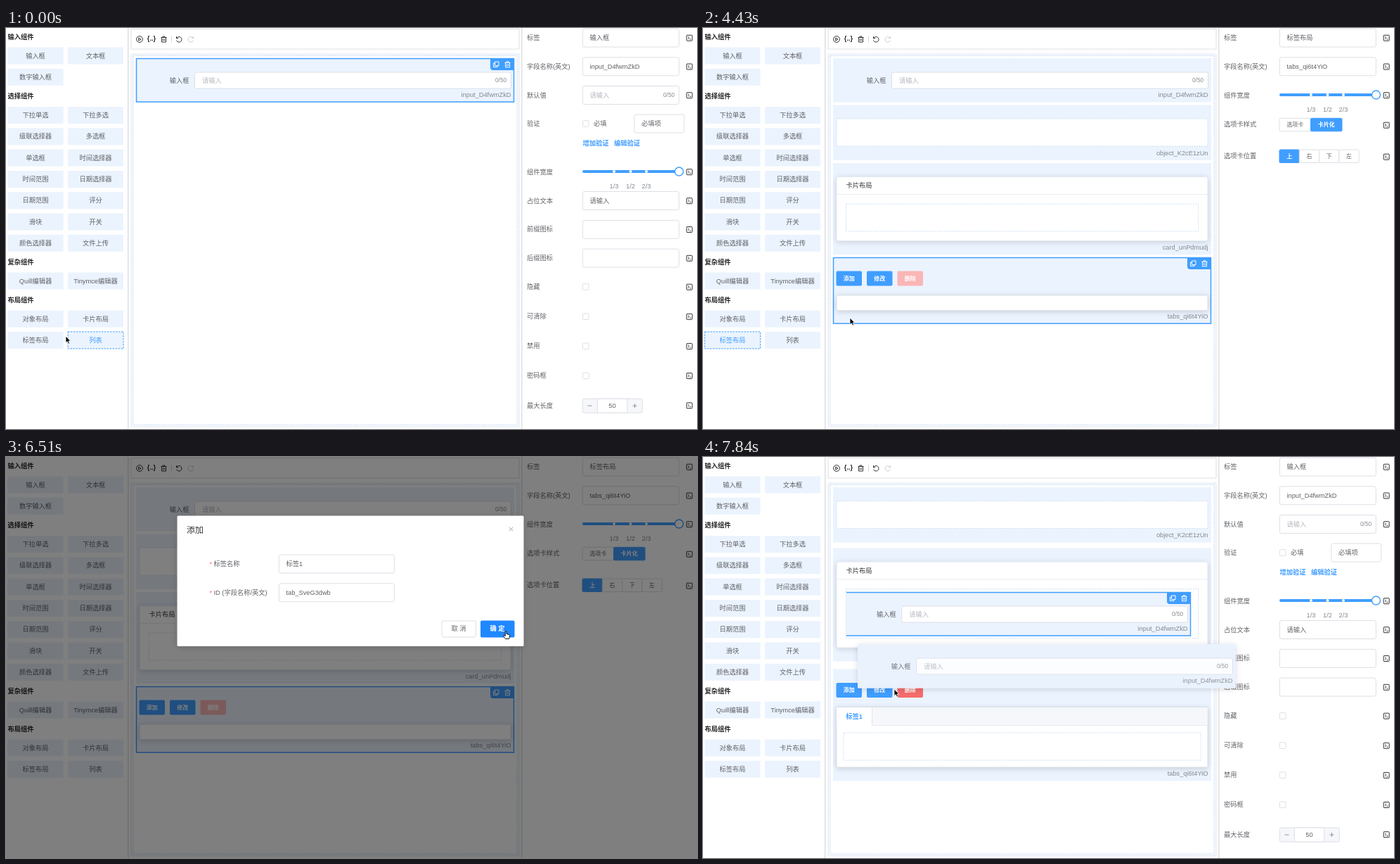
Recreate the animation shown at these times as an HTML page with a canvas. Size 983 by 570 pixels, loop 7.99 s.

```html
<!DOCTYPE html>
<html lang="zh">
<head>
<meta charset="utf-8">
<style>
  html, body { margin: 0; width: 100%; height: 100%; overflow: hidden; background: #fff; }
  canvas { display: block; }
</style>
</head>
<body>
<canvas id="stage" width="983" height="570"></canvas>
<script>
const g = document.getElementById('stage').getContext('2d');
const LOOP = 7990, TICK = 148, LAST = 53;
const BLUE = '#409eff', PALE = '#ebf3fe', GREY = '#606266', LINE = '#dcdfe6', RED = '#f56c6c';
const FONT = '"Liberation Sans", "Noto Sans CJK SC", sans-serif';

// ---- drawing helpers ----
function box(x, y, w, h, fill, line, { r = 0, dash = [], lw = 1, shadow } = {}) {
  g.save();
  g.beginPath();
  g.roundRect(x, y, w, h, r);
  if (shadow) { g.shadowColor = 'rgba(0,0,0,.16)'; g.shadowBlur = 8; g.shadowOffsetY = 1.5; }
  if (fill) { g.fillStyle = fill; g.fill(); }
  g.shadowColor = 'transparent';
  if (line) { g.strokeStyle = line; g.lineWidth = lw; g.setLineDash(dash); g.stroke(); }
  g.restore();
}

function text(s, x, y, color = GREY, { align = 'left', size = 9.25, weight = 400 } = {}) {
  g.font = `${weight} ${size}px ${FONT}`;
  g.textAlign = align;
  g.textBaseline = 'middle';
  g.fillStyle = color;
  g.fillText(s, x, y + .5);
}
const mid = (s, x, y, color, o) => text(s, x, y, color, { align: 'center', ...o });

function stroke(x, y, d, color, lw = 1, fill) {
  g.save();
  g.translate(x, y);
  const p = new Path2D(d);
  if (fill) { g.fillStyle = fill; g.fill(p); }
  g.strokeStyle = color;
  g.lineWidth = lw;
  g.stroke(p);
  g.restore();
}

function disc(x, y, r, fill, line, lw = 1) {
  box(x - r, y - r, 2 * r, 2 * r, fill, line, { r, lw });
}

const trash = (x, y, c) => stroke(x, y, 'M-4 -2.5H4M-1.5 -2.5V-4H1.5V-2.5M-3 -2.5V4H3V-2.5M-1 -.5V2.2M1 -.5V2.2', c);
const copy = (x, y, c) => stroke(x, y, 'M-1.5 -3.5H4V2H-1.5ZM-1.5 -1.5H-3.5V4H2V2', c);
const turn = (x, y, c) => stroke(x, y, 'M-3.5 -4V-1.2H-.8M-3.2 -1.5A3.8 3.8 0 1 1 -3.4 1.6', c);

// ---- left panel ----
const GROUPS = [
  [12.5, '输入组件', ['输入框', '文本框', '数字输入框']],
  [97, '选择组件', ['下拉单选', '下拉多选', '级联选择器', '多选框', '单选框', '时间选择器', '时间范围',
    '日期选择器', '日期范围', '评分', '滑块', '开关', '颜色选择器', '文件上传']],
  [332.5, '复杂组件', ['Quill编辑器', 'Tinymce编辑器']],
  [386.5, '布局组件', ['对象布局', '卡片布局', '标签布局', '列表']]
];

function chip(s, x, y, hot, shadow) {
  const o = hot ? { dash: [2.5, 1.5], shadow } : {};
  box(x, y, 79, 24, PALE, hot && BLUE, o);
  mid(s, x + 39.5, y + 12, hot ? BLUE : GREY);
}

function palette(hot) {
  for (const [y, title, items] of GROUPS) {
    text(title, 2.5, y, '#222', { weight: 700 });
    items.forEach((s, k) => chip(s, k % 2 ? 88 : 2.5, y + 15 + (k >> 1) * 30.3, s === hot));
  }
}

// ---- middle ----
function frame() {
  box(173, -2, 1.5, 574, '#dedfe2');
  box(733, -2, 1.5, 574, '#dedfe2');
  box(178, 1.5, 552, 28.5, '#fff', '#dedfe2');
  disc(190, 16, 4.4, null, '#333');
  stroke(190, 16, 'M-1.3 -2L2 0L-1.3 2Z', '#333');
  mid('{..}', 207, 15, '#222', { weight: 700 });
  trash(224.5, 16, '#333');
  box(235, 11.5, .8, 9, '#ccc');
  turn(246, 16, '#333');
  g.save(); g.translate(263, 0); g.scale(-1, 1); turn(0, 16, '#d0d0d0'); g.restore();
  box(178, 37, 552, 530, '#f6f9fd', '#e3e8ef');
  box(181, 39.5, 546, 524.5, '#fff', '#c5dcf5', { dash: [2, 1.5] });
}

function block(x, y, w, h, id, selected) {
  box(x, y, w, h, PALE);
  text(id, x + w - 4.5, y + h - 10.5, '#85888e', { align: 'right' });
  if (!selected) return;
  box(x + .5, y + .5, w - 1, h - 1, null, BLUE, { lw: 1.5 });
  box(x + w - 34, y, 34, 17, BLUE, null, { r: [0, 0, 0, 4] });
  copy(x + w - 26, y + 8.5, '#fff');
  trash(x + w - 9.5, y + 8.8, '#fff');
}

const drop = (x, y, w, h) => box(x, y, w, h, '#fff', '#cfdff0', { dash: [2, 1.5] });

function inputBlock(x, y, w, selected) {
  const shift = (538 - w) * .06;
  block(x, y, w, 62.5, 'input_D4fwmZkD', selected);
  text('输入框', x + 75.5 - shift, y + 31.5, GREY, { align: 'right' });
  box(x + 83.5 - shift, y + 20, w - 88 + shift, 23, '#fff', LINE, { r: 2.5 });
  text('请输入', x + 94 - shift, y + 31.5, '#b5b8bf');
  text('0/50', x + w - 11, y + 31.5, '#85888e', { align: 'right', size: 8.2 });
}

function objectBlock(y, selected) {
  block(185, y, 538, 78.5, 'object_K2cE1zUn', selected);
  drop(190, y + 19.5, 528, 39);
}

function cardBlock(y, grow, selected) {
  block(185, y, 538, 130 + grow, 'card_unPdmudj', selected);
  box(190, y + 19.5, 528, 91 + grow, '#fff', '#e4e8ef', { r: 2.5, shadow: true });
  text('卡片布局', 203.5, y + 32, '#303133');
  box(190, y + 44, 528, .8, '#e4e7ed');
  drop(203.5, y + 58, 501, 39 + grow);
}

function button(s, x, y, color) {
  box(x, y, 36.5, 21, color, null, { r: 2 });
  mid(s, x + 18.2, y + 10.5, '#fff', { size: 8, weight: 700 });
}

function tabsBlock(y, filled, focus, selected) {
  block(185, y, 538, filled ? 159 : 94.5, 'tabs_qi6t4YiO', selected);
  button('添加', 189.5, y + 19.5, focus ? '#66b1ff' : BLUE);
  button('修改', 233, y + 19.5, BLUE);
  button('删除', 276.5, y + 19.5, filled ? RED : '#fab6b6');
  box(190, y + 54, 528, filled ? 85.5 : 21.5, '#fff', LINE, { shadow: true });
  if (!filled) return;
  box(190.5, y + 54.5, 527, 25.5, '#f5f7fa');
  box(240, y + 79.5, 478, .8, '#e4e7ed');
  box(190.5, y + 54.5, 49.5, 26.5, '#fff');
  box(240, y + 54.5, .8, 25.5, LINE);
  mid('标签1', 215, y + 67.5, BLUE, { weight: 700 });
  drop(200, y + 90.5, 508, 39);
}

function bar(s, y) {
  box(185, y, 538, 22.5, PALE);
  mid(s, 454, y + 11);
}

// ---- right panel ----
function prompt(y) {
  box(968.2, y - 3.8, 8, 8, null, '#333', { r: .8 });
  stroke(972, y, 'M-2 -1.8L0 0L-2 1.8M.5 2H2.5', '#333', .9);
}

function row(s, y, iconY = y) {
  text(s, 741, y);
  if (iconY) prompt(iconY);
}

function field(x, y, w, s = '', color = GREY) {
  box(x + .3, y - 13, w, 26, '#fff', LINE, { r: 2.5 });
  text(s, x + 10.5, y, color);
}

function slider(y, full) {
  box(820, y - 2, 137.5, 4, full ? BLUE : '#e4e7ed', null, { r: 2 });
  if (full) [865, 888.5, 911].forEach((x, k) => {
    disc(x, y, 2, '#fff');
    mid(['1/3', '1/2', '2/3'][k], x, y + 20.5, '#85888e');
  });
  disc(full ? 957.5 : 820, y, 6, '#fff', BLUE, 1.4);
}

function radios(y, w, names, active) {
  names.forEach((s, k) => {
    const on = k === active, x = 820 + k * w;
    box(x, y - 9, w, 18.5, on ? BLUE : '#fff', on ? BLUE : LINE, { r: 1.5 });
    mid(s, x + w / 2, y, on ? '#fff' : GREY, { size: 8, weight: on ? 700 : 400 });
  });
}

function stepper(x, y, value) {
  box(x + .3, y - 10, 85, 20, '#f5f7fa', LINE, { r: 2.5 });
  box(x + 21.3, y - 10, 42.5, 20, '#fff', LINE);
  mid(value, x + 42.5, y);
  stroke(x + 10.5, y, 'M-3 0H3M61 0H67M64 -3V3', '#85888e', .9);
}

function check(y) {
  box(820.4, y - 4.3, 8.6, 8.6, '#fff', LINE, { r: 1 });
}

const HEADS = {
  input: ['输入框', 'input_D4fwmZkD'], object: ['对象布局', 'object_K2cE1zUn'],
  card: ['卡片布局', 'card_unPdmudj'], tabs: ['标签布局', 'tabs_qi6t4YiO']
};

function width(y) {
  row('组件宽度', y);
  slider(y - .5, true);
}

const PANELS = {
  input() {
    row('默认值', 95.5);
    field(820, 95.5, 137, '请输入', '#b5b8bf');
    text('0/50', 951, 95.5, '#85888e', { align: 'right', size: 8.2 });
    row('验证', 136, 0);
    check(136);
    text('必填', 836, 136, GREY, { weight: 500 });
    field(893.5, 136, 71, '必填项');
    text('增加验证', 820.5, 164, BLUE, { weight: 700 });
    text('编辑验证', 865, 164, BLUE, { weight: 700 });
    width(204.5);
    ['占位文本', '前缀图标', '后缀图标'].forEach((s, k) => {
      const y = 245.5 + k * 40.8;
      row(s, y);
      field(820, y, 137, k ? '' : '请输入');
    });
    ['隐藏', '可清除', '禁用', '密码框'].forEach((s, k) => {
      row(s, 368 + k * 42.1);
      check(368 + k * 42.1);
    });
    row('最大长度', 536.5);
    stepper(820, 537, '50');
  },
  object() {
    width(95.5);
    row('行内间距', 136);
    slider(135.5);
  },
  card() {
    PANELS.object();
    row('阴影显示', 177.5, 179);
    radios(178, 36.4, ['总是', '悬浮', '从不'], 0);
    row('内边距', 222, 266.5);
    [...'上右下左'].forEach((s, k) => {
      text(s + ':', 820, 222 + k * 29.7, '#303133', { weight: 500 });
      stepper(838, 222 + k * 29.7, '20');
    });
  },
  tabs() {
    width(95.5);
    row('选项卡样式', 136.5, 138);
    radios(137.3, 44.5, ['选项卡', '卡片化'], 1);
    row('选项卡位置', 181.5, 183);
    radios(182, 28.3, [...'上右下左'], 0);
  }
};

function panel(kind) {
  ['标签', '字段名称(英文)'].forEach((s, k) => {
    const y = 14 + k * 40.8;
    row(s, y);
    field(820, y, 137, HEADS[kind][k]);
  });
  PANELS[kind]();
}

// ---- dialog ----
function dialog(p) {
  g.fillStyle = `rgba(0,0,0,${p / 2})`;
  g.fillRect(0, 0, 983, 570);
  g.save();
  g.globalAlpha = p;
  g.translate(0, -13 * (1 - p));
  box(243.5, 83.5, 493, 185.5, '#fff', null, { r: 1.5, shadow: true });
  text('添加', 257, 104.5, '#303133', { size: 11.9 });
  stroke(718.5, 102.5, 'M-2.6 -2.6L2.6 2.6M2.6 -2.6L-2.6 2.6', '#909399', .9);
  [['标签名称', '标签1'], ['ID (字段名称/英文)', 'tab_SveG3dwb']].forEach(([label, value], k) => {
    const y = 152 + k * 40.8;
    text('*', 289.5, y, RED);
    text(label, 295.5, y);
    field(388, y, 164, value);
  });
  box(620, 233, 48.5, 23, '#fff', LINE, { r: 2 });
  mid('取 消', 644, 244.3, GREY, { weight: 500 });
  box(675, 232.5, 48.5, 24, '#1f88ff', null, { r: 2 });
  mid('确 定', 699, 244.3, '#fff', { weight: 700 });
  g.restore();
}

// ---- timeline, in ticks ----
const HOVER = [[0, '列表'], [1, '标签布局'], [6, '对象布局'], [14, ''], [15, '卡片布局'], [25, '标签布局'], [31, '']];
const SELECTED = [[0, 'input'], [12, 'object'], [21, 'card'], [30, 'tabs'], [49, 'input']];
const FADE = [[0, 0], [36, .1], [37, .82], [38, 1], [45, .43], [46, .02], [47, 0]];
// first tick, last tick, name, grip offset
const DRAGS = [[9, 11, '对象布局', 54, 5], [18, 20, '卡片布局', 24, 7], [27, 29, '标签布局', 50, 8]];
const PATH = [
  [0, 85, 438], [3, 70, 438], [4, 70, 438], [5, 64, 430], [7, 56, 406], [8, 56, 406], [9, 90, 395],
  [10, 249, 330], [12, 250, 329], [13, 240, 345], [15, 145, 405], [16, 116, 409], [17, 112, 408],
  [18, 130, 400], [20, 219, 378], [21, 219, 378], [22, 215, 380], [24, 140, 412], [25, 75, 440],
  [26, 54, 440], [27, 70, 432], [28, 150, 425], [29, 209, 416], [31, 209, 408], [32, 209, 396],
  [34, 209, 355], [36, 209, 355], [37, 215, 356], [38, 300, 340], [40, 560, 290], [42, 700, 256],
  [43, 711, 248], [44, 711, 248], [46, 330, 122], [47, 262, 104], [48, 238, 102], [51, 237, 104],
  [52, 255, 190], [53, 272, 330]
];

const at = (keys, i) => keys.filter(k => k[0] <= i).pop()[1];

function pointer(i) {
  const n = PATH.findIndex(k => k[0] >= i);
  const [b, bx, by] = PATH[n], [a, ax, ay] = PATH[Math.max(n - 1, 0)];
  const p = b > a ? (i - a) / (b - a) : 1;
  return [ax + (bx - ax) * p, ay + (by - ay) * p];
}

function cursor(i, x, y) {
  if (i === 21) {
    stroke(x, y, 'M-4.5 0H4.5M0 -4.5V4.5M-3 -2L-5 0L-3 2M3 -2L5 0L3 2M-2 -3L0 -5L2 -3M-2 3L0 5L2 3', '#000', 1.3);
  } else if (i === 43 || i === 44) {
    stroke(x, y, 'M-.8 0Q.2 -1.2 1 0V3.5L5 4.5Q6 5 5.6 7L4.5 10.5H-.5L-3.5 6.5Q-3.5 5 -2 5.6L-.8 6.6Z', '#000', .9, '#fff');
  } else {
    stroke(x, y, 'M0 0V9.6L2.2 7.5L3.8 11L5.5 10.2L4 6.9H6.9Z', '#fff', .8, '#000');
  }
}

function draw(i) {
  const sel = at(SELECTED, i), moved = i === LAST, [x, y] = pointer(i);
  g.fillStyle = '#fff';
  g.fillRect(0, 0, 983, 570);
  palette(at(HOVER, i));
  frame();

  if (!moved) inputBlock(185, 43, 538, sel === 'input');
  if (i >= 12) objectBlock(moved ? 43 : 109.5, sel === 'object');
  else if (i >= 10) bar('对象布局', 109.5);
  if (i >= 21) cardBlock(moved ? 129.5 : 192, moved ? 31 : 0, sel === 'card');
  else if (i >= 19) bar('卡片布局', 192);
  if (i >= 30) tabsBlock(moved ? 301.5 : 326, i >= 45, i >= 45 && i < 48, sel === 'tabs');
  else if (i >= 28) bar('标签布局', 326);
  if (moved) {
    g.save();
    g.beginPath();
    g.rect(204, 188, 501, 70);
    g.clip();
    inputBlock(202, 192, 492, true);
    g.restore();
  }
  panel(sel);

  g.save();
  const drag = DRAGS.find(d => d[0] <= i && i <= d[1]);
  if (drag) {
    g.globalAlpha = .8;
    chip(drag[2], x - drag[3], y - drag[4], true, true);
  }
  if (i >= 52) {
    g.globalAlpha = .88;
    box(x - 52, y - 64, 538, 62.5, PALE, null, { shadow: true, r: 2 });
    inputBlock(x - 52, y - 64, 538);
  }
  g.restore();

  const p = at(FADE, i);
  if (p) dialog(p);
  cursor(i, x, y);
}

const start = performance.now();
function loop() {
  const t = (performance.now() - start) % LOOP;
  draw(Math.min(LAST, Math.floor((t + 20) / TICK)));
  requestAnimationFrame(loop);
}
loop();
</script>
</body>
</html>
```
